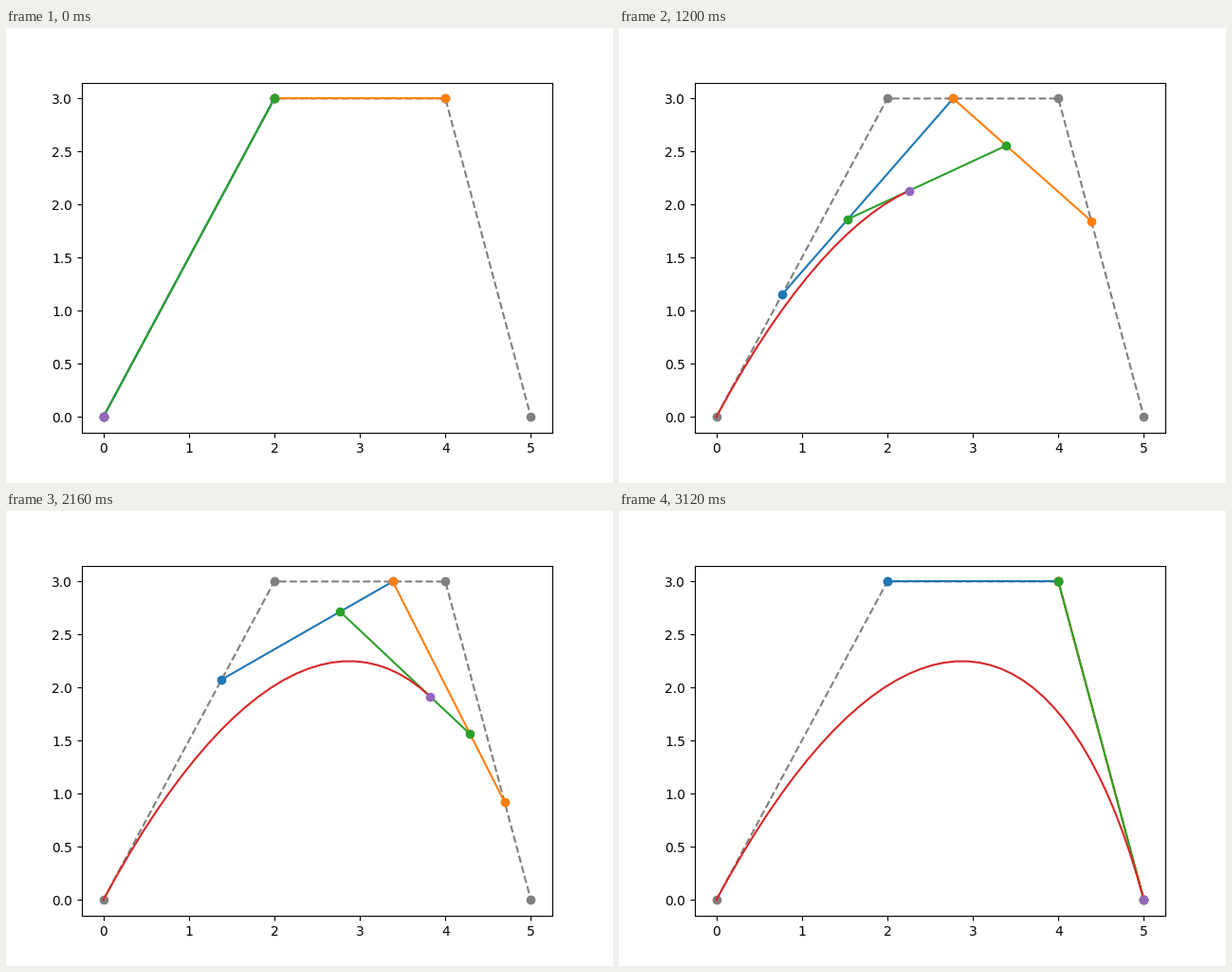
Write a matplotlib script that moves like this. It is 640 px wide and 480 px high and loops after 3.2 s.

```python
import numpy as np
import matplotlib.pyplot as plt
from matplotlib.animation import FuncAnimation

FRAMES = 40
LOOP_MS = 3200
CONTROL = np.array([[0, 0], [2, 3], [4, 3], [5, 0]], dtype=float)


def reduce_points(points, t):
    """One step of de Casteljau's construction."""
    return (1 - t) * points[:-1] + t * points[1:]


def bezier(t):
    points = CONTROL
    while len(points) > 1:
        points = reduce_points(points, t)
    return points[0]


times = np.linspace(0, 1, FRAMES)
path = np.array([bezier(t) for t in times])

fig, ax = plt.subplots(figsize=(6.4, 4.8), dpi=100)
ax.plot(*CONTROL.T, "o--", color="gray")
ax.set_xlim(-0.25, 5.25)
ax.set_ylim(-0.15, 3.15)

left, = ax.plot([], [], "o-", color="C0")
right, = ax.plot([], [], "o-", color="C1")
tangent, = ax.plot([], [], "o-", color="C2")
curve, = ax.plot([], [], color="C3")
tip, = ax.plot([], [], "o", color="C4")


def update(i):
    first = reduce_points(CONTROL, times[i])
    second = reduce_points(first, times[i])
    left.set_data(*first[:2].T)
    right.set_data(*first[1:].T)
    tangent.set_data(*second.T)
    curve.set_data(*path[:i + 1].T)
    tip.set_data(*path[i:i + 1].T)
    return left, right, tangent, curve, tip


anim = FuncAnimation(fig, update, frames=FRAMES, interval=LOOP_MS / FRAMES,
                     repeat=True, repeat_delay=0)
plt.show()
```
